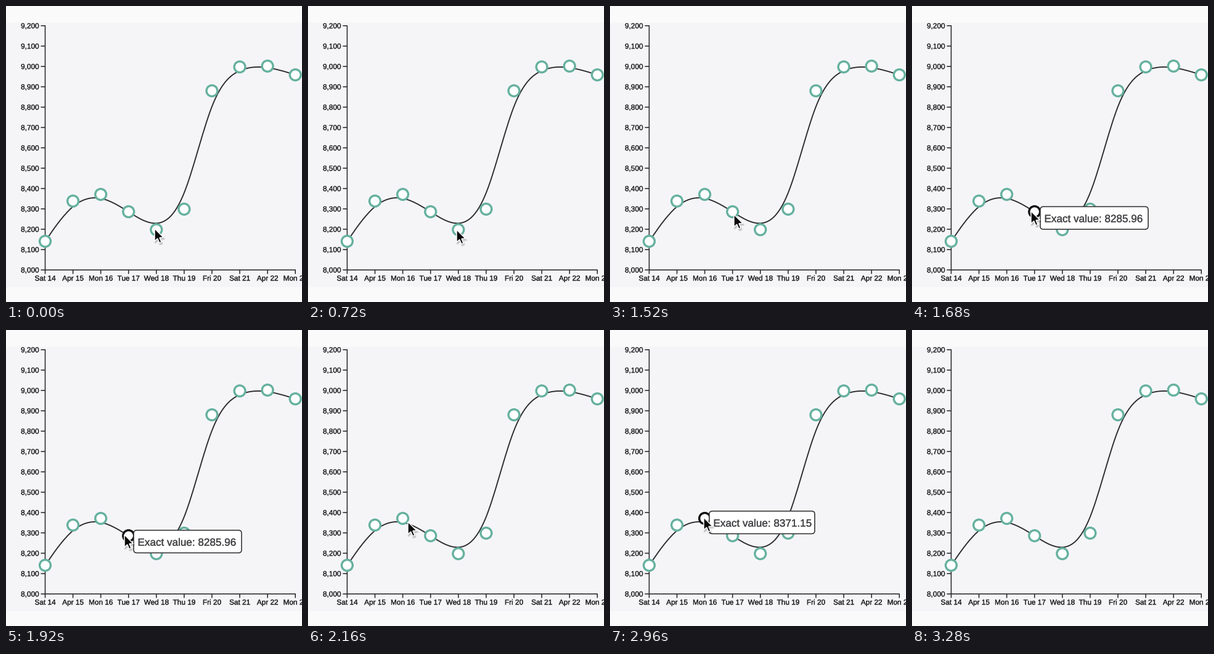
Animation, 480 px wide and 480 px high, one loop 3.52 s. Source, as a matplotlib script:

```python
import matplotlib.pyplot as plt
import numpy as np
from matplotlib.animation import FuncAnimation
from matplotlib.patches import Circle, FancyBboxPatch, Polygon, Rectangle
from matplotlib.patheffects import withStroke

SIZE, DPI = 480, 80
STEP, LOOP = 80, 3520
PT = 72 / DPI  # points per pixel

LEFT, RIGHT, BOTTOM, TOP = 63.5, 469.2, 428, 32
INK, GREEN = "#2b2b2d", "#66b19f"
VALUES = [8140.71, 8338.42, 8371.15, 8285.96, 8197.8,
          8298.69, 8880.23, 8997.57, 9001.64, 8958.55]
WEEK = ["Sun", "Mon", "Tue", "Wed", "Thu", "Fri", "Sat"]

# The pointer visits three points: index, departure for it, arrival,
# where the pointer rests, and the tooltip corner relative to the pointer.
VISITS = [(4, 640, 960, (241, 365), (9, -6.5)),
          (3, 1200, 1760, (192, 332), (15, -7.3)),
          (2, 1920, 2400, (152, 304), (9, -10.3))]
START, EXIT = (241, 361), 3040
LEAD, LAG = 160, 80  # tooltip opens before arrival, closes after departure

ARROW = 1.2 * np.array([(0, 0), (0, 17), (3.9, 13.3), (6.5, 19.3),
                        (9.2, 18.2), (6.7, 12.2), (12, 12)])


def y_of(value):
    return BOTTOM - (value - 8000) / 1200 * (BOTTOM - TOP)


def day_name(i):
    weekday = WEEK[(i + 6) % 7]
    return f"{'Apr' if weekday == 'Sun' else weekday} {14 + i}"


def basis_curve(points, n=16):
    """Uniform cubic B-spline that starts and ends on the end points."""
    p = np.vstack([[points[0]] * 2, points, [points[-1]] * 2])
    t = np.linspace(0, 1, n)[:, None]
    parts = []
    for a, b, c, d in zip(p, p[1:], p[2:], p[3:]):
        parts.append(((1 - t) ** 3 * a + (3 * t**3 - 6 * t**2 + 4) * b
                      + (-3 * t**3 + 3 * t**2 + 3 * t + 1) * c + t**3 * d) / 6)
    return np.vstack(parts)


def pointer(t):
    tip = np.array(START, float)
    for _, depart, arrive, rest, _ in VISITS:
        u = np.clip((t - depart) / (arrive - depart), 0, 1)
        tip += (rest - tip) * (1 - (1 - u) ** 2)
    return tip


def hovered(t):
    departs = [v[1] + LAG for v in VISITS[1:]] + [EXIT - STEP]
    for visit, close in zip(VISITS, departs):
        if visit[2] - LEAD <= t <= close:
            return visit
    return None


plt.rcParams["text.hinting"] = "none"
fig = plt.figure(figsize=(SIZE / DPI, SIZE / DPI), dpi=DPI, facecolor="#fafafa")
ax = fig.add_axes([0, 0, 1, 1])
ax.set_xlim(0, SIZE)
ax.set_ylim(SIZE, 0)
ax.axis("off")


def line(x, y, width=1.6, z=2):
    ax.plot(x, y, color=INK, lw=width * PT, solid_capstyle="butt",
            snap=False, zorder=z)


def label(x, y, text, size=11.8, color=INK, z=2, **kw):
    return ax.text(x, y, text, family="Liberation Sans", fontsize=size * PT,
                   color=color, va="center_baseline", zorder=z,
                   path_effects=[withStroke(linewidth=0.3, foreground=color)], **kw)


ax.add_patch(Rectangle((0, 27), SIZE, 429, fc="#f5f5f8", lw=0, zorder=0))

xs = np.linspace(LEFT, RIGHT, len(VALUES))
ys = np.array([y_of(v) for v in VALUES])

line([LEFT, LEFT], [TOP - 0.6, BOTTOM + 0.6])
line([LEFT, RIGHT + 0.6], [BOTTOM, BOTTOM])
for v in range(8000, 9201, 100):
    line([LEFT - 7, LEFT], [y_of(v)] * 2)
    label(53.5, y_of(v) - 0.2, f"{v:,}", ha="right")
for i, x in enumerate(xs):
    line([x, x], [BOTTOM, BOTTOM + 6.5])
    label(x, 441, day_name(i), ha="center")

curve = basis_curve(np.column_stack([xs, ys]))
line(curve[:, 0], curve[:, 1], 1.9, 3)

dots = [ax.add_patch(Circle((x, y), 8.9, fc="white", ec=GREEN, lw=3.4 * PT, zorder=4))
        for x, y in zip(xs, ys)]

tip_box = ax.add_patch(FancyBboxPatch(
    (0, 0), 160, 37, boxstyle="round,pad=0,rounding_size=5",
    fc="white", ec="#333333", lw=1.6 * PT, zorder=6))
tip_text = label(0, 0, "", 17.1, "#464649", 7)

shadow = ax.add_patch(Polygon(ARROW, fc="black", ec="black", lw=3 * PT,
                              alpha=0.13, joinstyle="round", zorder=8))
arrow = ax.add_patch(Polygon(ARROW, fc="#0a0a0a", ec="white", lw=1.5 * PT,
                             joinstyle="miter", zorder=9))


def draw(frame):
    t = frame * STEP
    tip = pointer(t)
    for part, shift in ((arrow, (0, 0)), (shadow, (1.2, 2.5))):
        part.set_xy(ARROW + tip + shift)
        part.set_visible(t < EXIT)

    for dot in dots:
        dot.set_edgecolor(GREEN)
    visit = hovered(t)
    tip_box.set_visible(visit is not None)
    tip_text.set_visible(visit is not None)
    if visit:
        i, offset = visit[0], visit[-1]
        dots[i].set_edgecolor("#111111")
        x, y = tip + offset
        text = f"Exact value: {VALUES[i]}"
        # the digit 1 takes less room than the others
        tip_box.set_bounds(x, y, 12 * len(text) - 65 - 2 * text.count("1"), 36.7)
        tip_text.set_position((x + 6.5, y + 19))
        tip_text.set_text(text)
    return [*dots, tip_box, tip_text, shadow, arrow]


anim = FuncAnimation(fig, draw, frames=LOOP // STEP, interval=STEP,
                     repeat=True, repeat_delay=0, blit=False)
plt.show()
```
